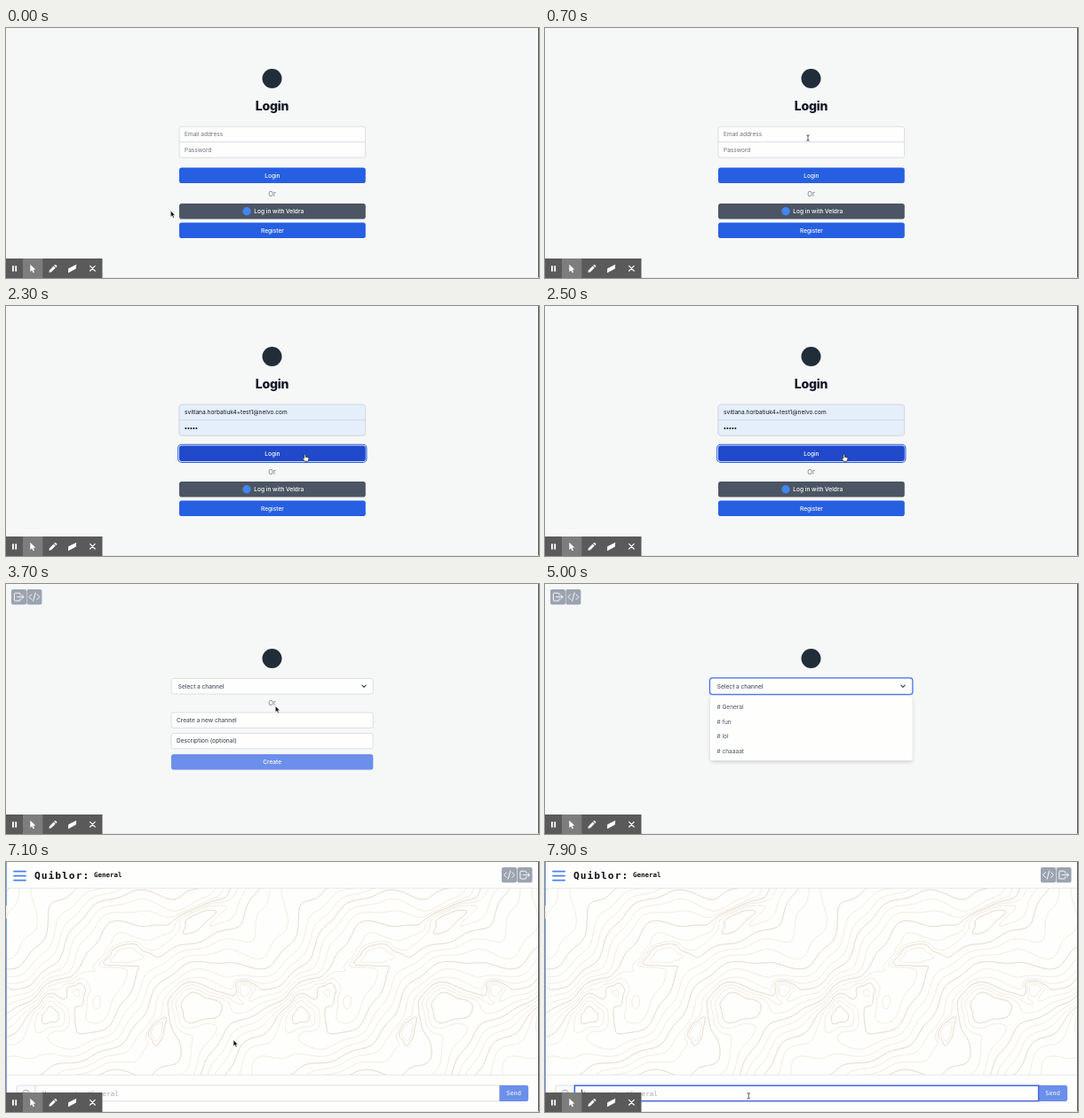
Recreate the animation shown at these times as an HTML page with a canvas. Size 600 by 282 pixels, loop 8000 ms.

```html
<!DOCTYPE html>
<html lang="en">
<head>
<meta charset="utf-8">
<title>Channel login</title>
<style>
html, body { margin: 0; width: 100%; height: 100%; overflow: hidden; background: #fefefc; }
canvas, svg { position: absolute; left: 0; top: 0; width: 600px; height: 282px; display: block; }
text { white-space: pre; }
</style>
</head>
<body>
<canvas id="map" width="600" height="282"></canvas>
<svg id="stage" viewBox="0 0 600 282" xmlns="http://www.w3.org/2000/svg"></svg>
<script>
const LOOP = 8000, STEP = 100;
const SANS = 'Inter, sans-serif', MONO = "'DejaVu Sans Mono', monospace";
const PAGE = '#f6f8f8', WHITE = '#fefefd', LINE = '#d3d7dc', BLUE = '#265fe2', SOFT = '#6b8fea', NAVY = '#222d3a';
const EMAIL = 'svitlana.horbatiuk4+test1@nelvo.com';

// ---- markup helpers ----
const rect = (x, y, w, h, fill, more = '') =>
  `<rect x="${x}" y="${y}" width="${w}" height="${h}" fill="${fill}" ${more}/>`;
const line = (d, stroke, width, more = '') =>
  `<path d="${d}" fill="none" stroke="${stroke}" stroke-width="${width}" stroke-linecap="round" stroke-linejoin="round" ${more}/>`;
const dot = (x, y, r, fill) => `<circle cx="${x}" cy="${y}" r="${r}" fill="${fill}"/>`;
const group = (id, body) => `<g id="${id}">${body}</g>`;
function text(x, mid, str, { size = 6.56, fill = '#6b7280', weight = 400, anchor = 'start', font = SANS, more = '' } = {}) {
  return `<text x="${x}" y="${mid + size * 0.36}" font-family="${font}" font-size="${size}" font-weight="${weight}" fill="${fill}" text-anchor="${anchor}" ${more}>${str}</text>`;
}
const box = (x, y, w, h) => rect(x, y, w, h, WHITE, `rx="2.8" stroke="${LINE}" stroke-width=".8"`);
const button = (x, y, w, label, fill, more = '') =>
  rect(x, y, w, 17.6, fill, `rx="2.8" ${more}`) +
  text(x + w / 2, y + 9, label, { fill: '#fff', weight: 500, anchor: 'middle' });
const or = y => text(299.5, y, 'Or', { size: 7.5, anchor: 'middle' });

const tile = (x, d) => `<g transform="translate(${x} 6)">${rect(0, 0, 17, 17.2, '#9ba4b0', 'rx="2"')}${line(d, '#f8fafb', 1)}</g>`;
const exitIcon = x => tile(x, 'M10 6.4V5.2a1 1 0 0 0-1-1H4.4a1 1 0 0 0-1 1V12a1 1 0 0 0 1 1H9a1 1 0 0 0 1-1V10.8M6.6 8.6H14M11.8 6.4L14 8.6 11.8 10.8');
const codeIcon = x => tile(x, 'M5.3 5.8L2.6 8.6 5.3 11.4M11.7 5.8L14.4 8.6 11.7 11.4M9.8 4L7.2 13.2');

// ---- views ----
const login = rect(0, 0, 600, 282, PAGE) +
  dot(299.5, 57, 11, NAVY) +
  text(299.5, 88, 'Login', { size: 14.06, weight: 800, fill: '#111827', anchor: 'middle', more: 'letter-spacing="-.2"' }) +
  box(195, 111.2, 209.6, 35) +
  group('blank', text(201, 120, 'Email address') + text(201, 137.5, 'Password')) +
  group('filled',
    rect(195, 111.2, 209.6, 35, '#e5eefb', `rx="2.8" stroke="${LINE}" stroke-width=".8"`) +
    text(201, 120, EMAIL, { fill: '#15181d', more: 'id="email"' }) +
    [0, 1, 2, 3, 4].map(i => dot(202.4 + i * 3, 138, 1, '#15181d')).join('')) +
  line('M195 128.6H404.6', LINE, .8) +
  group('focus', line('M195 128.6V114a2.8 2.8 0 0 1 2.8-2.8H401.8a2.8 2.8 0 0 1 2.8 2.8V128.6Z', '#6f9ff0', 1)) +
  rect(0, 116, .7, 8, '#111', 'id="caret"') +
  group('ring', rect(193.7, 156.2, 212.2, 20.2, '#fff', 'rx="4" stroke="#2f62df" stroke-width="1.1"')) +
  group('idle', button(195, 157.5, 209.8, 'Login', BLUE)) +
  group('hover', button(195, 157.5, 209.8, 'Login', '#2049cb')) +
  or(187) +
  rect(195, 197.9, 209.8, 17.6, '#4b5563', 'rx="2.8"') +
  dot(271, 206.7, 4.7, '#4285f4') +
  text(279.3, 206.8, 'Log in with Veldra', { fill: '#fff', weight: 500 }) +
  button(195, 219.5, 209.8, 'Register', BLUE);

const dark = { fill: '#4b5563', weight: 500 };
const channels = rect(0, 0, 600, 282, PAGE) + exitIcon(6) + codeIcon(23.4) +
  dot(299.5, 84, 11, NAVY) +
  box(186, 106.5, 227.3, 17.6) +
  text(193.8, 115.2, 'Select a channel', dark) +
  line('M400.8 114.2L403 116.4 405.2 114.2', '#374151', 1.1) +
  group('form', or(134.5) +
    box(186, 145, 227.3, 17.4) + text(192, 153.7, 'Create a new channel', dark) +
    box(186, 168.4, 227.3, 17.4) + text(192, 177.1, 'Description (optional)', dark) +
    button(186, 192, 227.3, 'Create', SOFT)) +
  group('menu',
    rect(185.4, 105.9, 228.5, 18.8, 'none', 'rx="3.2" stroke="#4b79ea" stroke-width="1.3"') +
    rect(186, 126.4, 227.3, 72.5, WHITE, 'rx="2.8" filter="url(#shade)"') +
    rect(186, 130, 227.3, 16.8, '#e3ebfb', 'id="row"') +
    ['General', 'fun', 'lol', 'chaaaat'].map((name, i) =>
      text(193.5, 138.3 + i * 16.9, '# ' + name, { fill: '#4b5563' })).join(''));

const mono = { font: MONO, size: 7.5 };
const chat = rect(0, 0, 600, 29.5, WHITE) + line('M0 29.6H600', '#e3e5e8', .8) +
  line('M9 10.6H22M9 15.6H22M9 20.6H22', '#4a80ee', 1.9) +
  text(32, 15, 'Quiblor:', { font: MONO, size: 11.25, weight: 700, fill: '#111', more: 'letter-spacing="1"' }) +
  text(99, 14.6, 'General', { ...mono, weight: 700, fill: '#111' }) +
  codeIcon(558) + exitIcon(575.5) +
  rect(0, 240.2, 600, 42, WHITE) + line('M0 240.2H600', '#e3e5e8', .8) +
  rect(12, 252, 21, 17.8, '#fafbfb', `rx="2.5" stroke="${LINE}" stroke-width=".8"`) +
  line('M18.7 261a3.8 3.8 0 1 0 7.6 0a3.8 3.8 0 1 0-7.6 0M20.6 262q1.9 2 3.8 0M21.2 259.8v.1M23.8 259.8v.1', '#8b939e', .8) +
  rect(33, 252, 522.5, 17.8, WHITE, `stroke="${LINE}" stroke-width=".8"`) +
  text(41, 261, 'Message to #General', { ...mono, fill: '#a3a8b0' }) +
  line('M555.5 251.7H585.3a2.8 2.8 0 0 1 2.8 2.8V267.2a2.8 2.8 0 0 1-2.8 2.8H555.5Z', 'none', 0, `style="fill:${SOFT}"`) +
  text(571.6, 261, 'Send', { font: MONO, size: 6.9, fill: '#fff', anchor: 'middle' }) +
  group('typing', rect(33.4, 252.2, 522.2, 17.4, 'none', 'stroke="#4568dd" stroke-width="1.5"') +
    rect(41, 256.5, .8, 9, '#111')) +
  rect(0, 0, 1, 282, '#7ba0dc') + rect(0, 49, 1, 15, '#ece7de');

const toolbar = rect(0, 260, 108.5, 22, '#5a5a5a') + rect(19, 260, 22.3, 22, '#7d7d7d') +
  rect(7, 268.2, 1.8, 6.4, '#fff') + rect(10.3, 268.2, 1.8, 6.4, '#fff') +
  '<path fill="#fff" d="M27.3 266.8V275l2-1.7 1.3 2.9 1.4-.6-1.3-2.8 2.6-.2Z"/>' +
  '<path fill="#fff" d="M48.4 275.8l.5-2.6 4.7-4.7 2.1 2.1-4.7 4.7ZM54.2 267.9l.8-.8q.5-.4 1 0l1.2 1.2q.4.5 0 1l-.8.8Z"/>' +
  '<path fill="#fff" d="M70.2 271.2L79.2 266.8 78.8 271.6 70 276.2Z"/>' +
  line('M94.6 268.4L100.2 274M100.2 268.4L94.6 274', '#fff', 1.2);

const cursors =
  group('arrow', '<path d="M0 0V7.2L1.7 5.7 2.9 8.3 4.2 7.7 3 5.2H5.2Z" fill="#111" stroke="#fff" stroke-width=".6"/>') +
  group('hand', '<path d="M-.8.8Q0-.4.8.8V3.2L3.6 3.8Q4.6 4.1 4.4 5.2L3.7 8.2H-.4L-2.4 5.2Q-2.4 4-.8 5Z" fill="#fff" stroke="#222" stroke-width=".75" stroke-linejoin="round"/>') +
  group('beam', line('M-1.3-3.2Q0-3.2 0-2.4Q0-3.2 1.3-3.2M0-2.4V2.4M-1.3 3.2Q0 3.2 0 2.4Q0 3.2 1.3 3.2', '#333', .8));

const stage = document.getElementById('stage');
stage.innerHTML =
  '<defs><filter id="shade" x="-10%" y="-10%" width="120%" height="130%"><feDropShadow dx="0" dy="2" stdDeviation="2.2" flood-color="#000" flood-opacity=".16"/></filter></defs>' +
  group('login', login) + group('channels', channels) + group('chat', chat) +
  rect(599, 0, 1, 282, '#55585b') + rect(0, 281.3, 600, .7, '#dcdfe0') + toolbar +
  '<circle id="click" cx="289.2" cy="142" r="9.9" fill="#fff" fill-opacity=".3" stroke="#dd5577" stroke-width="1.5"/>' +
  group('pointer', cursors);

// ---- contour map, repeating every PERIOD pixels ----
const PERIOD = 282, TAU = Math.PI * 2, BANDS = 12;
// x, y, half width, half height, turn, rise, falloff, wobble
const HILLS = [
  [80, 147, 17, 18, 0, 4.3, 2, 1], [50, 173, 25, 22, -.5, 5.4, 2.4, 2],
  [135, 106, 26, 13, -.15, 2.4, 5, 3], [216, 66, 34, 13, -.6, 3.3, 4, 4],
  [217, 164, 32, 22, .1, 3.4, 4, 5], [269, 144, 10, 11, .3, 3.4, 3, 0],
  [170, 191, 8, 14, .3, 3.2, 3, 2]
];
const slope = (x, y) => BANDS * (x + 1.55 * y) / PERIOD +
  1.5 * Math.sin(TAU * (x / PERIOD - y / 230) + 1) +
  .8 * Math.sin(TAU * (2 * x / PERIOD + y / 170)) +
  .25 * Math.sin(TAU * 5 * x / PERIOD - y / 13);
function height(x, y) {
  let h = slope(x, y);
  for (const [cx, cy, rx, ry, turn, rise, fall, seed] of HILLS) {
    for (const shift of [-PERIOD, 0, PERIOD]) {
      const dx = x - cx - shift, dy = y - cy;
      const u = (dx * Math.cos(turn) + dy * Math.sin(turn)) / rx;
      const v = (dy * Math.cos(turn) - dx * Math.sin(turn)) / ry;
      const a = Math.atan2(v, u);
      const r = Math.hypot(u, v) * (1 + .14 * Math.sin(3 * a + seed) + .07 * Math.sin(5 * a - seed));
      if (r < 2.6) h += (slope(cx + shift, cy) + rise - h) * Math.exp(-(r ** fall));
    }
  }
  return h;
}
function drawMap() {
  const cell = 2, top = 28, rows = 107, cols = PERIOD / cell;
  const grid = Array.from({ length: rows + 1 }, (_, j) =>
    Array.from({ length: cols + 1 }, (_, i) => height(i * cell, top + j * cell)));
  const thin = new Path2D(), bold = new Path2D();
  for (let j = 0; j < rows; j++) for (let i = 0; i < cols; i++) {
    const corners = [[i, j], [i + 1, j], [i + 1, j + 1], [i, j + 1]].map(([a, b]) => [a * cell, top + b * cell, grid[b][a]]);
    const hs = corners.map(c => c[2]);
    for (let level = Math.ceil(Math.min(...hs)); level <= Math.max(...hs); level++) {
      const cuts = [];
      corners.forEach((p, k) => {
        const q = corners[(k + 1) % 4];
        if ((p[2] < level) === (q[2] < level)) return;
        const f = (level - p[2]) / (q[2] - p[2]);
        cuts.push([p[0] + f * (q[0] - p[0]), p[1] + f * (q[1] - p[1])]);
      });
      const path = level % 3 ? thin : bold;
      for (let k = 0; k + 1 < cuts.length; k += 2) {
        path.moveTo(...cuts[k]);
        path.lineTo(...cuts[k + 1]);
      }
    }
  }
  const ctx = document.getElementById('map').getContext('2d');
  ctx.lineCap = 'round';
  for (let k = 0; k < 3; k++) {
    ctx.strokeStyle = '#f1ece3'; ctx.lineWidth = .8; ctx.stroke(thin);
    ctx.strokeStyle = '#e9dfd1'; ctx.lineWidth = 1; ctx.stroke(bold);
    ctx.translate(PERIOD, 0);
  }
}
drawMap();

// ---- timeline ----
// time, x, y, cursor from here on
const MOVES = [
  [0, 185.3, 206, 'arrow'], [100, 185.3, 206, 'arrow'], [300, 215, 190, 'arrow'], [600, 292, 128, 'beam'],
  [800, 300, 120, 'beam'], [1000, 300, 120, 'arrow'], [1200, 318, 137, 'arrow'], [1500, 336.4, 147, 'arrow'],
  [1700, 336.5, 162, 'hand'], [1900, 336.5, 167, 'hand'], [2600, 336.5, 167, 'arrow'], [2800, 302, 193, 'arrow'],
  [3600, 302, 193, 'arrow'], [3700, 303.2, 137.5, 'arrow'], [3800, 302, 126, 'arrow'], [3900, 301, 119, 'hand'],
  [4000, 300, 116, 'hand'], [4900, 300, 116, ''], [5300, 297, 128, 'arrow'], [5400, 295, 133, 'hand'],
  [5900, 289, 140.5, 'hand'], [6500, 289, 140.5, 'arrow'], [6600, 289, 140.5, 'arrow'], [6900, 270, 172, 'arrow'],
  [7000, 270, 172, 'arrow'], [7300, 228, 258, 'beam'], [7500, 229.2, 263.8, 'beam']
];
// part: [from, to] spans in which it shows
const SHOWN = {
  login: [0, 2600], channels: [2600, 6100], chat: [6100, LOOP],
  blank: [0, 1200], filled: [1200, 2600], focus: [800, 2200], caret: [800, 1700],
  idle: [0, 1700], hover: [1700, 2600], ring: [2200, 2600],
  form: [2600, 4500], menu: [4500, 6100], row: [5400, 6100],
  click: [6100, 6300], typing: [7800, LOOP], map: [6100, LOOP]
};
const parts = {};
for (const id of [...Object.keys(SHOWN), 'arrow', 'hand', 'beam', 'pointer', 'email']) parts[id] = document.getElementById(id);
const show = (id, on) => { parts[id].style.display = on ? '' : 'none'; };
const emailEnd = 201 + parts.email.getComputedTextLength() + .3;

function render(t) {
  for (const id in SHOWN) show(id, t >= SHOWN[id][0] && t < SHOWN[id][1]);
  parts.caret.setAttribute('x', t < 1200 ? 201 : emailEnd);
  let i = MOVES.length - 1;
  while (MOVES[i][0] > t) i--;
  const [t0, x0, y0, kind] = MOVES[i];
  const [t1, x1, y1] = MOVES[i + 1] || [LOOP, x0, y0];
  const f = (t - t0) / (t1 - t0);
  parts.pointer.setAttribute('transform', `translate(${x0 + (x1 - x0) * f} ${y0 + (y1 - y0) * f})`);
  for (const id of ['arrow', 'hand', 'beam']) show(id, id === kind);
}

const start = performance.now();
let last = -1;
function tick() {
  const t = Math.floor((performance.now() - start) % LOOP / STEP) * STEP;
  if (t !== last) render(last = t);
  requestAnimationFrame(tick);
}
tick();
</script>
</body>
</html>
```
